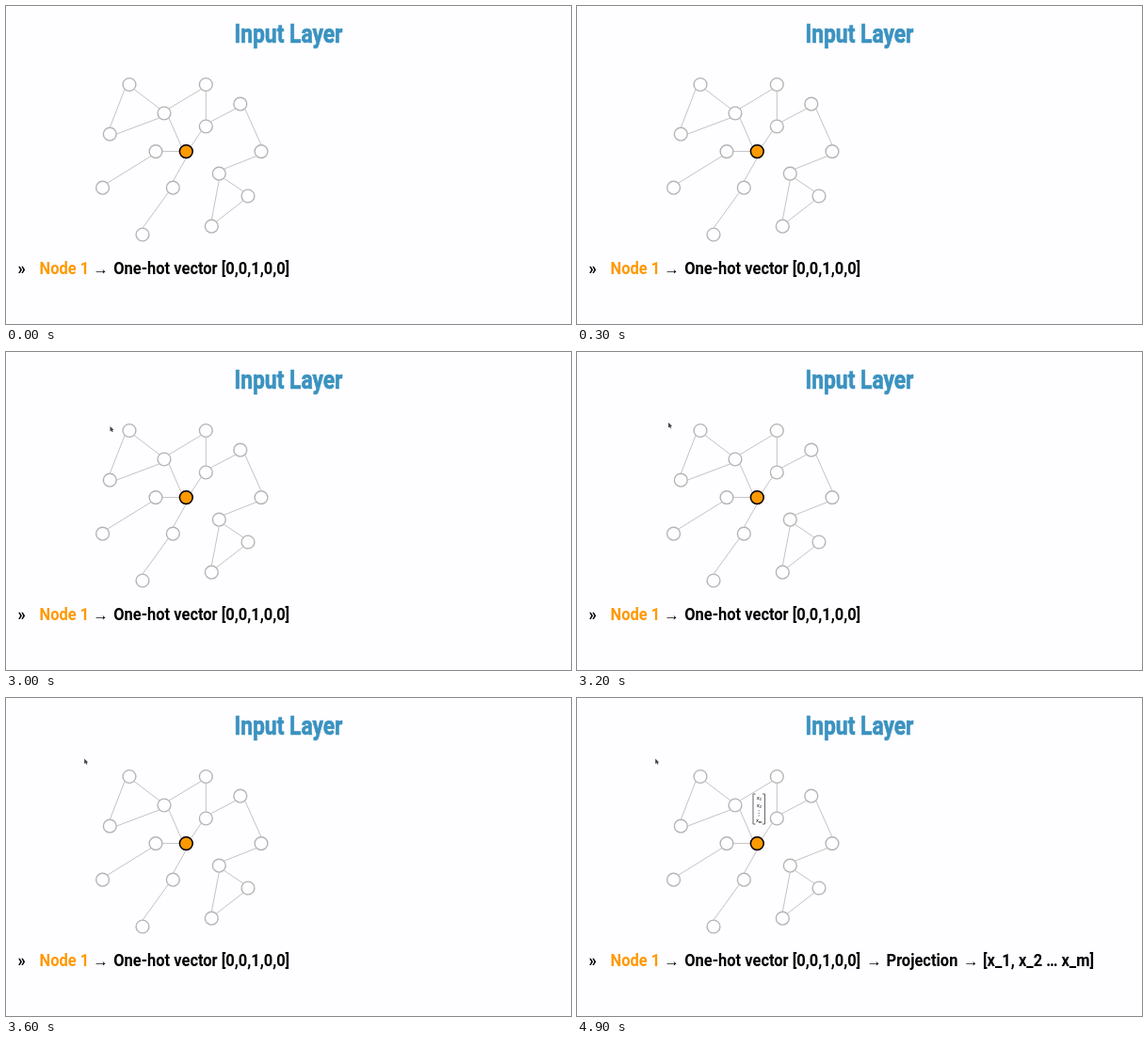
Write an HTML page that moves like this. It is 600 by 338 pixels and loops after 8 s.

```html
<!DOCTYPE html>
<html lang="en">
<head>
<meta charset="utf-8">
<title>Input Layer</title>
<style>
  html, body { margin: 0; width: 100%; height: 100%; overflow: hidden; background: #fefdff; }
  svg { display: block; width: 100vw; height: 100vh; }
  text { font: bold 18.4px Roboto, sans-serif; }
  .title { font-size: 28px; fill: #3a92c0; stroke: #3a92c0; stroke-width: .7; text-anchor: middle; }
  .arrow { font: 16.5px "Liberation Sans", sans-serif; }
  .entry { font: italic bold 6.2px "Liberation Serif", serif; fill: #333; text-anchor: middle; }
  .entry tspan { font-size: 4.5px; }
  #edges { fill: none; stroke: #bdbdbd; stroke-width: .9; }
  #nodes { fill: #fefdff; stroke: #b4b4b4; stroke-width: 1.4; }
</style>
</head>
<body>
<svg viewBox="0 0 600 338">
  <text class="title" transform="translate(300 39.3) scale(.815 1)">Input Layer</text>

  <path id="edges"/>
  <g id="nodes"></g>
  <circle cx="191.3" cy="154.6" r="6.9" fill="#f90" stroke="#000" stroke-width="1.5"/>

  <g id="line"></g>

  <g id="projection">
    <g id="lineEnd"></g>
    <path d="M189.5 102h-2.5v32h2.5M197 102h2.5v32h-2.5" fill="none" stroke="#555" stroke-width=".9"/>
    <text class="entry" x="193.3" y="107.6">x<tspan dy="1">1</tspan></text>
    <text class="entry" x="193.3" y="115.6">x<tspan dy="1">2</tspan></text>
    <path d="M193.2 119.5v.9m0 1.6v.9m0 1.6v.9" stroke="#333" stroke-width=".9"/>
    <text class="entry" x="193.3" y="132">x<tspan dy="1">m</tspan></text>
  </g>

  <path id="cursor" d="M0 0V5.4L1.3 4.4 2.2 6.2 3.2 5.7 2.4 4 4.1 3.8Z" fill="#444"/>
</svg>
<script>
const LOOP = 8000, CURSOR_START = 2700, PROJECTION_START = 4800, STEP = 100;
const RADIUS = 6.9;
const $ = id => document.getElementById(id);

const nodes = {
  a: [131, 83.5], b: [168, 114], c: [110.3, 136.2], d: [212.3, 83.5], e: [212.3, 128],
  f: [248.8, 104.2], g: [271, 154.6], h: [226.3, 178.2], i: [257, 202], j: [218.3, 234.2],
  k: [159, 154.6], l: [102.6, 193.2], m: [177.3, 193.2], n: [145, 243], o: [191.3, 154.6]
};
// Each end is a node and a port on its rim: eighths of a turn, clockwise from east.
const edges = "a1b5 a3c6 c0b3 b7d3 d2e6 e7f3 f1g6 g3h7 h1i5 h2j6 i3j7 b1o5 e3o7 k0o4 m6o2 k3l7 m3n6";
const port = (name, eighth) => {
  const [x, y] = nodes[name], angle = eighth * Math.PI / 4;
  return [x + RADIUS * Math.cos(angle), y + RADIUS * Math.sin(angle)];
};
$("edges").setAttribute("d", edges.split(" ")
  .map(([p, from, q, to]) => `M${port(p, from)}L${port(q, to)}`).join(""));
$("nodes").innerHTML = Object.values(nodes)
  .map(([x, y]) => `<circle cx="${x}" cy="${y}" r="${RADIUS}"/>`).join("");

// Condensed face: every word shares the same horizontal proportion.
const word = (x, text, fill = "#000") =>
  `<text transform="translate(${x} 285) scale(.895 1)" fill="${fill}">${text}</text>`;
const arrow = x => `<text class="arrow" x="${x}" y="285">→</text>`;
$("line").innerHTML = word(12.5, "»") + word(35.5, "Node 1", "#f90") + arrow(92.2) +
  word(114.2, "One-hot vector [0,0,1,0,0]");
$("lineEnd").innerHTML = arrow(307.3) + word(328.5, "Projection") + arrow(410) +
  word(431, "[x_1, x_2 … x_m]");

// Cursor tip, one position per step
const path = [[74, 92], [90, 87], [105, 82], [110.5, 79], [105, 77],
  [97, 75], [91, 71], [86, 68.2], [83.5, 66.2], [83.2, 64.6]];

function draw(now) {
  const t = now % LOOP;
  const step = Math.floor((t - CURSOR_START) / STEP);
  const tip = path[Math.max(0, Math.min(step, path.length - 1))];
  $("cursor").setAttribute("transform", `translate(${tip})`);
  $("cursor").style.display = step < 0 ? "none" : "";
  $("projection").style.display = t < PROJECTION_START ? "none" : "";
  requestAnimationFrame(() => draw(performance.now()));
}
draw(performance.now());
</script>
</body>
</html>
```
